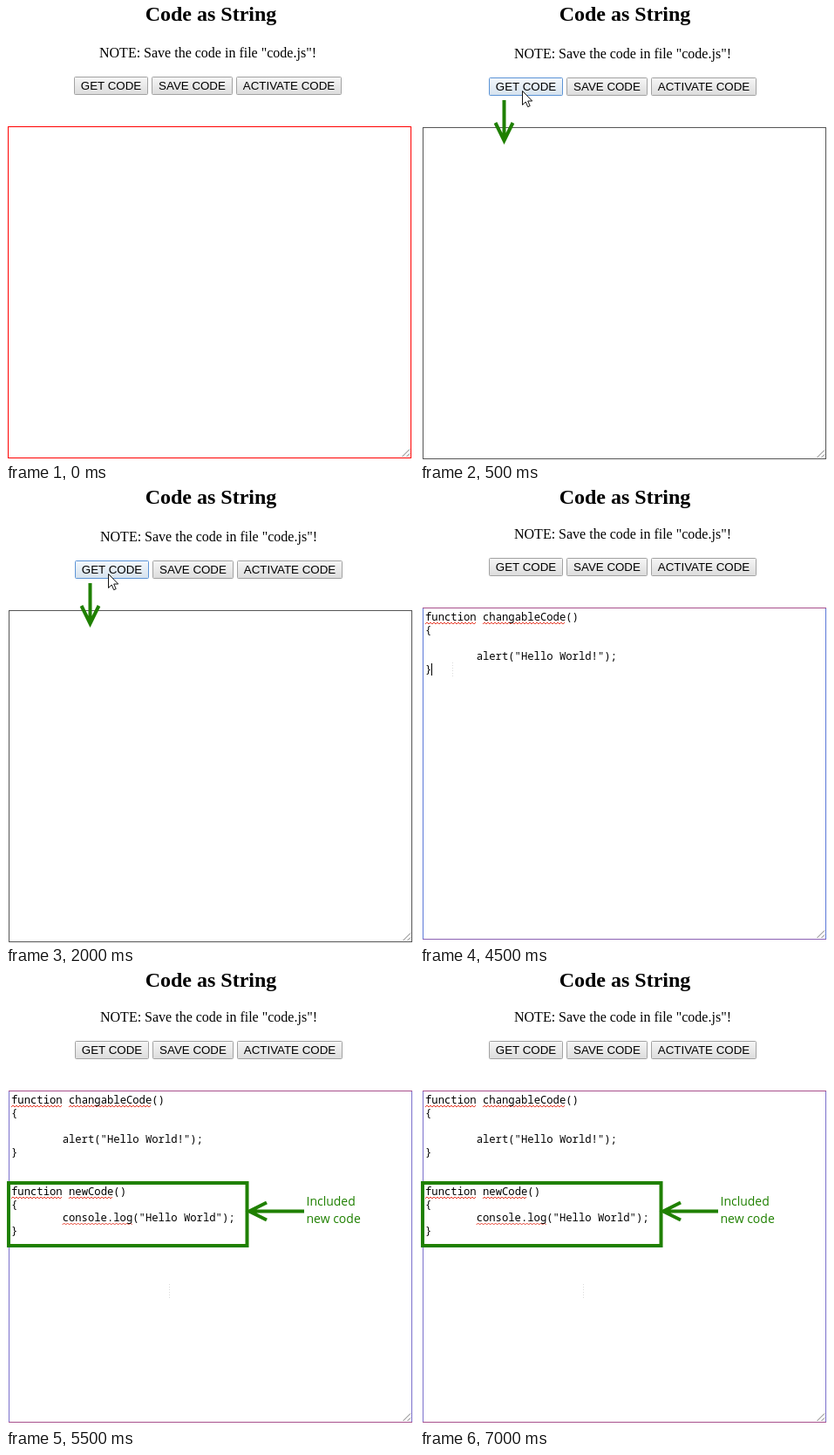
Animation, 468 px wide and 522 px high, one loop 8 s. Source, as an HTML page:

```html
<!DOCTYPE html>
<html lang="en">
<head>
<meta charset="utf-8">
<title>Code as String</title>
<style>
html, body { margin: 0; width: 100%; height: 100%; overflow: hidden; background: #fff; }
svg { display: block; width: 468px; height: 522px; }
text { white-space: pre; }
.serif { font-family: "Liberation Serif", "Times New Roman", serif; text-anchor: middle; }
.label { font: 13.333px "Liberation Sans", Arial, sans-serif; text-anchor: middle; }
.code { font: 12.22px "Noto Sans Mono", monospace; }
.note { font: 14px "Open Sans", sans-serif; fill: #1f8000; }
.mark { fill: none; stroke: #1f8000; stroke-width: 4; }
.wave { fill: none; stroke: #e8402f; stroke-width: 1; }
.ghost { stroke: #dcdcdc; stroke-dasharray: 1 2; }
</style>
</head>
<body>
<svg viewBox="0 0 468 522" xmlns="http://www.w3.org/2000/svg">
  <defs>
    <linearGradient id="grey" x2="0" y2="1">
      <stop stop-color="#f6f6f6"/><stop offset="1" stop-color="#dcdcdc"/>
    </linearGradient>
    <linearGradient id="blue" x2="0" y2="1">
      <stop stop-color="#f4f8fc"/><stop offset="1" stop-color="#d5e2ee"/>
    </linearGradient>
  </defs>
  <rect width="468" height="522" fill="#fff"/>
  <text class="serif" x="235" y="17" font-size="24" font-weight="bold">Code as String</text>
  <g id="page">
    <text class="serif" x="231.5" y="59" font-size="16">NOTE: Save the code in file "code.js"!</text>
    <g id="buttons"></g>
    <path id="sides" fill="none" d="M2.5 138V519M464.5 138V519"/>
    <path id="top" fill="none" d="M2 138.5H465"/>
    <path id="bottom" fill="none" d="M2 518.5H465"/>
    <path d="M454.5 517L463 508.500M459.500 517L463 513.500" stroke="#777" fill="none"/>
  </g>
  <g id="press">
    <path class="mark" d="M96.500 108V155M86.500 134L96.500 154.500L106.500 134"/>
    <path d="M117.500 97.500V113.500L121.200 110L123.700 115.700L126.200 114.600L123.700 109H128.700Z"
      fill="#fff" stroke="#111"/>
  </g>
  <g id="first"></g>
  <g id="caret">
    <path d="M13.500 200V214" stroke="#000"/>
    <path class="ghost" d="M37.500 199V215"/>
  </g>
  <g id="added">
    <g id="second"></g>
    <path class="ghost" d="M187.500 358V374"/>
    <rect class="mark" x="3" y="242" width="273.500" height="72"/>
    <path class="mark" d="M342 274.500H279M299 264.500L279 274.500L299 284.500"/>
    <text class="note" x="344.500" y="267.500">Included</text>
    <text class="note" x="344.500" y="287.500">new code</text>
  </g>
</svg>
<script>
const $ = id => document.getElementById(id);
const COL = 7.33, LEFT = 6, ROW = 15, BASE = 151;

function add(parent, tag, attrs, text) {
  const el = document.createElementNS("http://www.w3.org/2000/svg", tag);
  for (const key in attrs) el.setAttribute(key, attrs[key]);
  if (text) el.textContent = text;
  parent.appendChild(el);
  return el;
}

function button(x, w, label) {
  const box = add($("buttons"), "rect",
    { x: x + 0.5, y: 81.5, width: w - 1, height: 20, rx: 1, fill: "url(#grey)", stroke: "#a2a2a2" });
  add($("buttons"), "text", { class: "label", x: x + w / 2, y: 96 }, label);
  return box;
}

function line(parent, row, col, text) {
  add(parent, "text", { class: "code", x: LEFT + col * COL, y: BASE + row * ROW }, text);
}

// Spelling underline beneath a run of characters
function wave(parent, row, col, count) {
  const x = LEFT + col * COL, y = BASE + row * ROW + 2;
  let d = `M${x} ${y + 2}`;
  for (let i = 2; i <= count * COL; i += 2) d += `L${x + i} ${y + (i % 4 ? 0 : 2)}`;
  add(parent, "path", { class: "wave", d });
}

function block(parent, row, name, bodyRow, body) {
  wave(parent, row, 0, 8);
  wave(parent, row, 9, name.length);
  line(parent, row, 0, `function ${name}()`);
  line(parent, row + 1, 0, "{");
  line(parent, bodyRow, 8, body);
  line(parent, bodyRow + 1, 0, "}");
}

const getButton = button(78, 85, "GET CODE");
button(167, 93, "SAVE CODE");
button(264, 121, "ACTIVATE CODE");
block($("first"), 0, "changableCode", 3, 'alert("Hello World!");');
wave($("second"), 9, 8, 11);
block($("second"), 7, "newCode", 9, 'console.log("Hello World");');

// Start time, page offset, border colours (sides, top, bottom)
const steps = [
  { at: 0, dx: 0, dy: 0, edge: ["#ff0000", "#ff0000", "#ff0000"] },
  { at: 500, dx: 1, dy: 1, edge: ["#555", "#555", "#555"] },
  { at: 3000, dx: 1, dy: -2, edge: ["#5b78d8", "#a8508c", "#8b62b4"] },
  { at: 5500, dx: 1, dy: -2, edge: ["#7b70cc", "#a8508c", "#a8508c"] }
];
const LOOP = 8000;

function show(id, on) {
  $(id).setAttribute("visibility", on ? "visible" : "hidden");
}

function draw(ms) {
  let n = steps.length - 1;
  while (steps[n].at > ms) n--;
  const s = steps[n];
  $("page").setAttribute("transform", `translate(${s.dx} ${s.dy})`);
  ["sides", "top", "bottom"].forEach((id, i) => $(id).setAttribute("stroke", s.edge[i]));
  getButton.setAttribute("stroke", n === 1 ? "#5c94d6" : "#a2a2a2");
  getButton.setAttribute("fill", n === 1 ? "url(#blue)" : "url(#grey)");
  show("press", n === 1);
  show("first", n > 1);
  show("caret", n === 2);
  show("added", n === 3);
}

const start = performance.now();
function tick(now) {
  draw(Math.max(0, now - start) % LOOP);
  requestAnimationFrame(tick);
}
draw(0);
requestAnimationFrame(tick);
</script>
</body>
</html>
```
